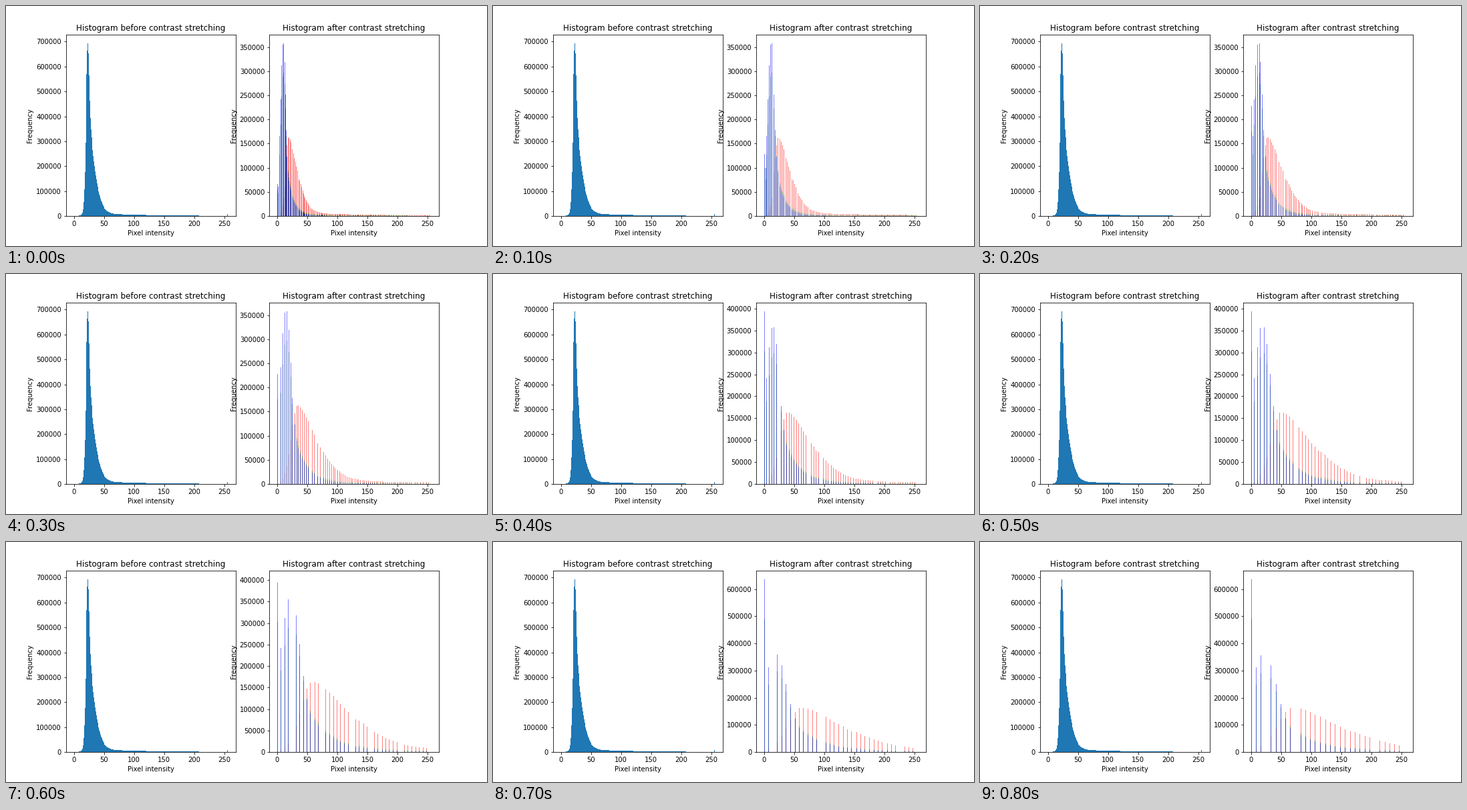
Animation, 720 px wide and 360 px high, one loop 0.9 s. Source, as a matplotlib script:

```python
import numpy as np
import matplotlib.pyplot as plt
from matplotlib.animation import FuncAnimation

plt.rcParams["font.family"] = "DejaVu Sans"

LEVELS = np.arange(256)
PEAK = 23

# Limits that cut off 1 % to 9 % of the pixels at each end.
LOW = [16, 17, 18, 18, 19, 19, 19, 20, 20]
HIGH = [186, 144, 116, 97, 81, 67, 60, 55, 51]


def bump(center, height, left, right, power=2):
    """Peak with a Gaussian left flank and its own right flank."""
    x = LEVELS - center
    flank = np.where(x < 0, np.abs(x / left) ** 2, np.abs(x / right) ** power)
    return height * np.exp(-flank)


def shoulder(height, decay):
    x = LEVELS - PEAK
    return height * np.exp(-np.clip(x - 4, 0, None) / decay) * (x > 0)


def blend(a, b):
    """Smooth maximum of two curves."""
    return (a ** 4 + b ** 4) ** 0.25


def shadows(height):
    return height * np.exp((LEVELS - 17) / 4) * (LEVELS <= 17)


def tail(height):
    """Bright pixels: slow decay up to 207 and a few saturated ones."""
    decay = height * np.exp(-np.clip(LEVELS - 60, 0, None) / 80)
    fade = np.where(LEVELS <= 207, 1, 0.4)
    return decay * fade * (LEVELS > 40) + 2.3 * (LEVELS == 255)


def stretch(counts, low, high):
    out = (np.clip(LEVELS, low, high) - low) * 255 // (high - low)
    return np.bincount(out, weights=counts, minlength=256)


def histogram(ax, counts, **style):
    return ax.hist(LEVELS, bins=256, range=(0, 256), weights=counts, **style)[2]


def decorate(ax, title):
    ax.set_title(title)
    ax.set_xlabel("Pixel intensity")
    ax.set_ylabel("Frequency")
    ax.set_xlim(-12.8, 268.8)


# Pixel counts per channel, in thousands.
red = bump(PEAK + 5.5, 164, 4.53, 13.6, 1.6) + tail(5.2)
red[60:] *= 401.6 / red[60:].sum()
green = (blend(bump(PEAK - 0.25, 298.6, 4.06, 4.06), shoulder(108, 6.5))
         + shadows(6.5) + tail(2.4))
blue = (blend(bump(PEAK - 0.45, 362.2, 4.0125, 4.0125), shoulder(100, 6.3))
        + shadows(7.4) + tail(0.6))
channels = [1000 * c for c in (red, green, blue)]

fig, (before, after) = plt.subplots(1, 2, figsize=(10, 5), dpi=72)
fig.subplots_adjust(left=0.125, right=0.9, bottom=0.125, top=0.88, wspace=0.2)

decorate(before, "Histogram before contrast stretching")
total = sum(channels)
histogram(before, total, color="C0")
before.set_ylim(0, 1.05 * total.max())

decorate(after, "Histogram after contrast stretching")
bars = [histogram(after, counts, color=color, alpha=0.5)
        for counts, color in zip(channels, ("red", "green", "blue"))]


def update(i):
    stretched = [stretch(c, LOW[i], HIGH[i]) for c in channels]
    for group, counts in zip(bars, stretched):
        for bar, height in zip(group, counts):
            bar.set_height(height)
    after.set_ylim(0, 1.05 * np.max(stretched))
    return []


anim = FuncAnimation(fig, update, frames=len(LOW), interval=100,
                     init_func=lambda: update(0), repeat=True, repeat_delay=0)
plt.show()
```
